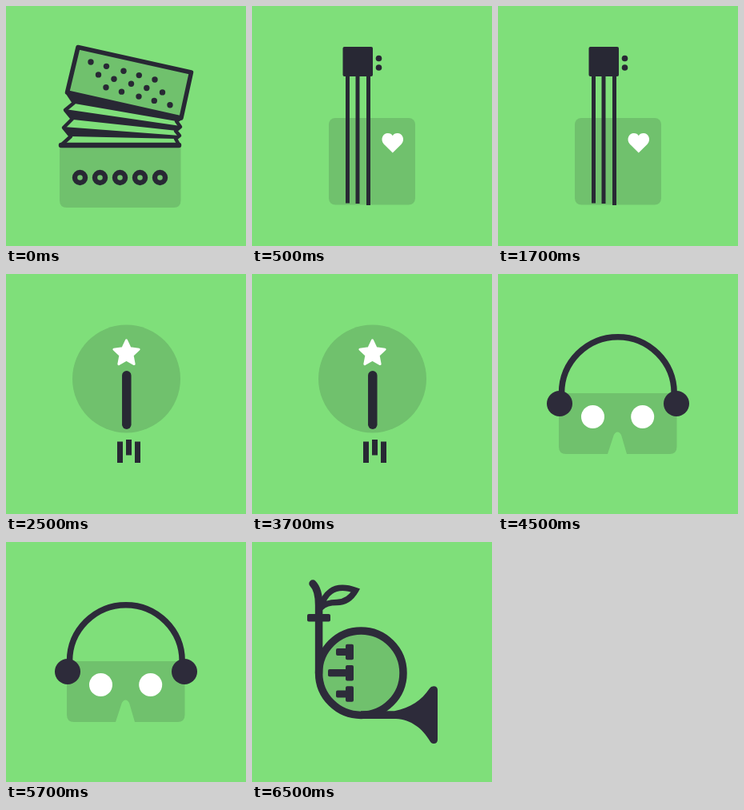
These frames come from a looping animation (300x300 px, 8000 ms). An HTML page:

```html
<!DOCTYPE html>
<html lang="en">
<head>
<meta charset="utf-8">
<title>Icon loop</title>
<style>
  html, body { margin: 0; width: 100%; height: 100%; overflow: hidden; background: #7fdf7a; }
  svg { display: block; width: 100%; height: 100%; }
  .scene { visibility: hidden; }
  .shade { fill: #70c16d; }
  .ink { fill: #282834; }
  .line { fill: none; stroke: #282834; }
  .soft .ink { fill: #2d2b3a; }
  .soft .line { stroke: #2d2b3a; }
  .white { fill: #fff; }
</style>
</head>
<body>
<svg viewBox="0 0 300 300">
  <g class="scene" id="accordion">
    <path class="shade" d="M67 174H218.5V243Q218.5 252 209.5 252H76Q67 252 67 243Z"/>
    <g class="ink">
      <path d="M76 108L219 140L213 144L86 122Z"/>
      <path d="M74 129L218 150L214 156L84 142Z"/>
      <path d="M72 151L217 162L213 166L82 163Z"/>
    </g>
    <path class="line" stroke-width="4.5" stroke-linejoin="round" d="M77 109L85 121L74 130L83 141L72 152L81 163L70 173M219 140L213 144L218 151L212 156L217 162L212 166L216 173"/>
    <path class="line" stroke-width="6.5" stroke-linecap="round" d="M69 174H216"/>
    <path class="shade" stroke="#282834" stroke-width="5.5" stroke-linejoin="round" d="M90 51.5L231.5 83L219 140L76.5 108Z"/>
    <g class="ink" id="holes"></g>
    <g class="line" stroke-width="6.4" id="buttons"></g>
  </g>

  <g class="scene" id="transistor">
    <rect class="shade" x="96" y="140" width="108" height="108.5" rx="8"/>
    <g class="ink">
      <rect x="113.5" y="51" width="37.5" height="37" rx="2"/>
      <path d="M117 87h5v159.5h-5zM129.5 87h5v160h-5zM143 87h5v162h-5z"/>
      <circle cx="158.5" cy="65.5" r="3.8"/>
      <circle cx="158.5" cy="77" r="3.8"/>
    </g>
    <path class="white" d="M175.8 183.5L164.9 172.7C159.8 167 163.5 159 169.8 159C172.5 159 174.6 160.2 175.8 162.2C177 160.2 179.1 159 181.8 159C188.1 159 191.8 167 186.7 172.7Z"/>
  </g>

  <g class="scene" id="wand">
    <circle class="shade" cx="150.5" cy="131" r="67.5"/>
    <path class="white" id="star" stroke="#fff" stroke-width="3" stroke-linejoin="round"/>
    <path class="line" stroke-width="11.5" stroke-linecap="round" d="M150.8 126.8V188.2"/>
    <path class="ink" d="M139 209.5h7v26.5h-7zM150 207h7v19.5h-7zM161 209.5h7v26.5h-7z"/>
  </g>

  <g class="scene soft" id="headset">
    <path class="shade" d="M76 149H223.5V216Q223.5 225 214.5 225H161L154.3 202Q152.5 197.5 149.4 197.5Q146.3 197.5 144.5 202L137 225H85Q76 225 76 216Z"/>
    <path class="line" stroke-width="7.5" d="M79.5 160V149A70.35 70.35 0 0 1 220.2 149V160"/>
    <circle class="ink" cx="77" cy="162" r="16"/>
    <circle class="ink" cx="223" cy="162" r="16"/>
    <circle class="white" cx="118.5" cy="178.5" r="14.5"/>
    <circle class="white" cx="180.7" cy="178.5" r="14.5"/>
  </g>

  <g class="scene soft" id="horn">
    <circle class="shade" cx="136.3" cy="163.7" r="52.7"/>
    <circle class="line" cx="136.3" cy="163.7" r="52.7" stroke-width="9.5"/>
    <path class="line" stroke-width="9.5" stroke-linecap="round" d="M83.6 164V79C83.6 67 82 58 76 52"/>
    <path class="line" stroke-width="7.5" d="M86 82C91 77 98 75.5 106 75.5C117 75.5 124 70 129.5 60.5C118 56.5 106 56 98 62C91 67 88 74 86 82Z"/>
    <g class="ink">
      <rect x="69" y="90" width="29" height="9.5" rx="2"/>
      <path d="M136 211.3H178C198 207 212 198 222 183Q223.5 180.3 227 180.3Q232 180.3 232 185V247Q232 252 227 252Q224 252 222.5 249C213 233 199 222 180 221H136Z"/>
    </g>
    <g class="ink" id="valves"></g>
  </g>
</svg>
<script>
  const $ = id => document.getElementById(id);

  function add(parent, tag, attrs) {
    const el = document.createElementNS("http://www.w3.org/2000/svg", tag);
    for (const key in attrs) el.setAttribute(key, attrs[key]);
    $(parent).append(el);
  }

  const columns = [0, 19.5, 41, 60.3, 80];
  for (let row = 0; row < 3; row++)
    for (const x of columns)
      add("holes", "circle", { cx: 106 + x + row * 9.5, cy: 70 + x * 0.275 + row * 15.9, r: 3.7 });

  for (let i = 0; i < 5; i++)
    add("buttons", "circle", { cx: 92.5 + i * 25, cy: 214.5, r: 6.5 });

  [[105, 137.5], [95, 163.7], [105, 190]].forEach(([x, y]) => {
    add("valves", "rect", { x, y: y - 4.6, width: 119 - x, height: 9.2, rx: 2 });
    add("valves", "rect", { x: 117, y: y - 9.8, width: 10, height: 19.6, rx: 2 });
  });

  const tips = Array.from({ length: 10 }, (_, i) => {
    const r = i % 2 ? 8 : 16.4, a = i * Math.PI / 5;
    return [150.5 + r * Math.sin(a), 99.3 - r * Math.cos(a)];
  });
  $("star").setAttribute("d", "M" + tips.join("L") + "Z");

  const LOOP = 8000;
  const steps = [
    [0, "accordion"], [500, "transistor"], [2500, "wand"], [4500, "headset"], [6500, "horn"]
  ];

  function draw(now) {
    const t = now % LOOP;
    steps.forEach(([start, id], i) => {
      const end = i + 1 < steps.length ? steps[i + 1][0] : LOOP;
      $(id).style.visibility = t >= start && t < end ? "visible" : "hidden";
    });
  }

  const begin = performance.now();
  function tick() {
    draw(performance.now() - begin);
    requestAnimationFrame(tick);
  }
  tick();
</script>
</body>
</html>
```
